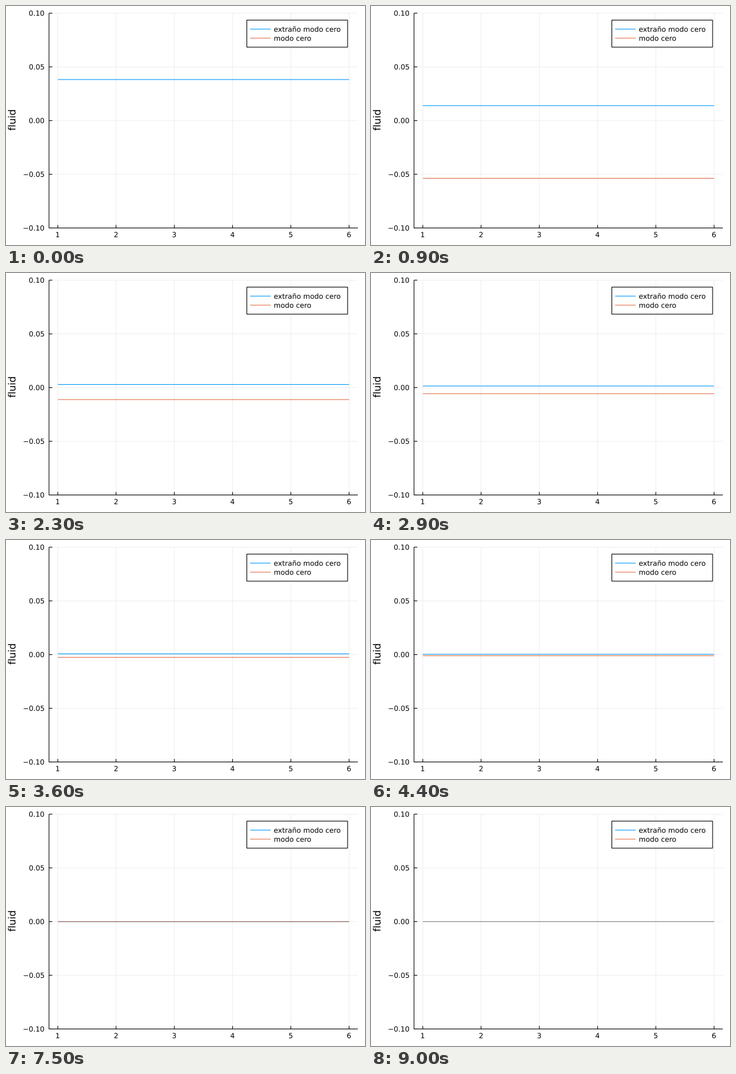
Write a matplotlib script that moves like this. It is 600 px wide and 400 px high and loops after 10 s.

```python
import math
import matplotlib.pyplot as plt
from matplotlib.animation import FuncAnimation
from matplotlib.patches import PathPatch, Rectangle
from matplotlib.textpath import TextPath
from matplotlib.transforms import Affine2D

W, H, DPI = 600, 400, 100
FRAMES, INTERVAL = 100, 100
BLUE, RED, GREY, GRID = "#009afa", "#e36f47", "#808080", "#eeeeee"
LEFT, RIGHT, TOP, BOTTOM = 71.9, 588, 12, 371.5
X1, X6 = 86.6, 573.4
ZERO, SCALE = 191.75, 1797.5
DECAY = 0.1122
BLUE_START, RED_START = 0.0382, -0.1476
PX = 72 / DPI

plt.rcParams["font.family"] = "DejaVu Sans"
fig = plt.figure(figsize=(W / DPI, H / DPI), dpi=DPI, facecolor="white")
ax = fig.add_axes([0, 0, 1, 1])
ax.set_xlim(0, W)
ax.set_ylim(H, 0)
ax.axis("off")


def stroke(xs, ys, color="black", width=1.1, zorder=4):
    return ax.plot(xs, ys, color=color, lw=width * PX, snap=False,
                   solid_capstyle="butt", zorder=zorder)[0]


def label(x, y, text, size=11.8, align="left", angle=0):
    """Draw text with its baseline through (x, y), at sub-pixel positions."""
    path = TextPath((0, 0), text, size=size)
    box = path.get_extents()
    shift = {"left": 0, "center": (box.x0 + box.x1) / 2, "right": box.x1}[align]
    place = Affine2D().translate(-shift, 0).scale(1, -1)
    place.rotate_deg(-angle).translate(x, y)
    ax.add_patch(PathPatch(place.transform_path(path), fc="black", lw=0,
                           snap=False, zorder=6))


def tick_x(k):
    return X1 + (X6 - X1) * (k - 1) / 5


def to_y(value):
    return ZERO - SCALE * value


# grid, ticks and tick labels
for k in range(1, 7):
    x = tick_x(k)
    stroke([x, x], [TOP, BOTTOM], GRID, 1, zorder=1)
    stroke([x, x], [BOTTOM, BOTTOM - 5])
    label(x - 0.2, 386.9, str(k), align="center")
for k in range(-2, 3):
    y = to_y(k * 0.05)
    stroke([LEFT, RIGHT], [y, y], GRID, 1, zorder=1)
    stroke([LEFT, LEFT + 5.5], [y, y])
    label(63.5, y + 4.3, f"{k * 0.05:.2f}".replace("-", "\u2212"),
          align="right")
stroke([LEFT, LEFT, RIGHT], [TOP, BOTTOM, BOTTOM])
label(15.8, 191.3, "fluid", 16.5, "center", 90)

# legend
ax.add_patch(Rectangle((402.5, 23.6), 168.4, 45.3, fc="white", ec="black",
                       lw=1.1 * PX, snap=False, zorder=5))
for y, color, text in ((38.7, BLUE, "extraño modo cero"),
                       (53.8, RED, "modo cero")):
    stroke([408, 442.3], [y, y], color, zorder=6)
    label(447.5, y + 4.4, text)

blue = stroke([X1, X6], [ZERO, ZERO], BLUE, zorder=2)
red = stroke([X1, X6], [ZERO, ZERO], RED, zorder=3)
red.set_clip_path(Rectangle((LEFT, TOP), RIGHT - LEFT, BOTTOM - TOP,
                            transform=ax.transData))


def update(n):
    fade = math.exp(-DECAY * n)
    for line, start in ((blue, BLUE_START), (red, RED_START)):
        y = to_y(start * fade)
        line.set_ydata([y, y])
    # the merged lines turn grey at the end
    merged = n >= 90
    blue.set_visible(not merged)
    red.set_color(GREY if merged else RED)
    return blue, red


anim = FuncAnimation(fig, update, frames=FRAMES, interval=INTERVAL,
                     repeat=True, repeat_delay=0)
plt.show()
```
